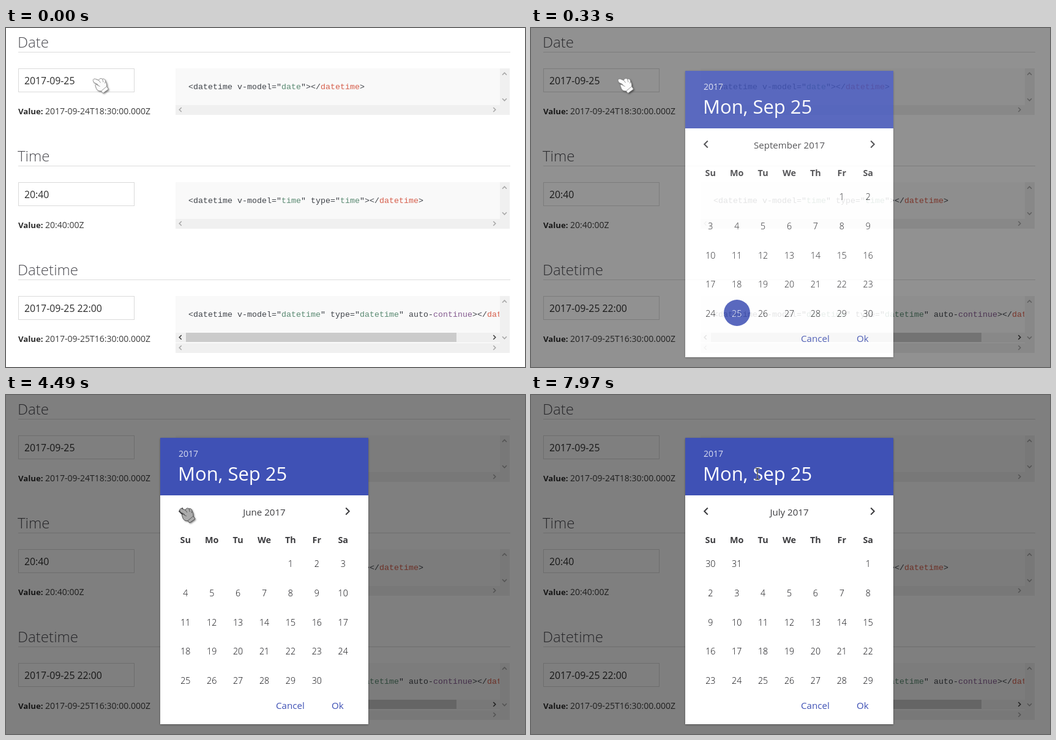
Write an HTML page with a canvas that moves like this. It is 848 px wide and 554 px high and loops after 8000 ms.

```html
<!DOCTYPE html>
<html lang="en">
<head>
<meta charset="utf-8">
<title>Datetime picker</title>
<style>
html, body { margin: 0; width: 100%; height: 100%; overflow: hidden; background: #fff; }
canvas { display: block; }
</style>
</head>
<body>
<canvas id="stage" width="848" height="554"></canvas>
<script>
const W = 848, H = 554, LOOP = 8000;
const SANS = '"Open Sans", "Noto Sans", sans-serif';
const MONO = '"Liberation Mono", monospace';
const BLUE = '#3f51b5', INK = '#3c3c3f';

const stage = document.getElementById('stage').getContext('2d');
const newLayer = () => {
  const c = document.createElement('canvas');
  c.width = W;
  c.height = H;
  return c.getContext('2d');
};
const modal = newLayer();

function rect(g, color, x, y, w, h) {
  g.fillStyle = color;
  g.fillRect(x, y, w, h);
}

function text(g, str, x, y, size, color, weight = 400, align = 'left', family = SANS) {
  g.font = `${weight} ${size}px ${family}`;
  g.textAlign = align;
  g.fillStyle = color;
  g.fillText(str, x, y);
}

// Angle mark centred on x, y; (dx, dy) is the direction it points to.
function chevron(g, x, y, dx, dy, r, width, color) {
  const h = r / 2;
  g.beginPath();
  g.moveTo(x - dx * h + dy * r, y - dy * h + dx * r);
  g.lineTo(x + dx * h, y + dy * h);
  g.lineTo(x - dx * h - dy * r, y - dy * h - dx * r);
  g.lineWidth = width;
  g.strokeStyle = color;
  g.stroke();
}

// ---- Page ----

const PLAIN = '#40444a', GREEN = '#5a8a72', RED = '#d65f4c', PURPLE = '#865c91';
const close = [['></', PLAIN], ['datetime', RED], ['>', PLAIN]];
const quoted = (name, value) => [[name + '="', PLAIN], [value, GREEN], ['"', PLAIN]];

const sections = [
  { title: 'Date', field: '2017-09-25', value: '2017-09-24T18:30:00.000Z',
    code: [['<datetime ', PLAIN], ...quoted('v-model', 'date'), ...close] },
  { title: 'Time', field: '20:40', value: '20:40:00Z',
    code: [['<datetime ', PLAIN], ...quoted('v-model', 'time'), ...quoted(' type', 'time'), ...close] },
  { title: 'Datetime', field: '2017-09-25 22:00', value: '2017-09-25T16:30:00.000Z', wide: true,
    code: [['<datetime ', PLAIN], ...quoted('v-model', 'datetime'), ...quoted(' type', 'datetime'),
      [' auto-', PLAIN], ['continue', PURPLE], ...close] }
];

function scrollArrows(g, y, color) {
  chevron(g, 285, y, -1, 0, 3.5, 1.6, color);
  chevron(g, 798, y, 1, 0, 3.5, 1.6, color);
}

function drawCode(g, y, { code, wide }) {
  const bar = y + (wide ? 77 : 60), height = wide ? 93 : 76;
  rect(g, '#f9f9f9', 277, y, 530, bar - y);
  rect(g, '#f0f0f0', 807, y, 16, height);
  rect(g, '#f0f0f0', 277, bar, 530, 16);
  chevron(g, 814.5, y + 9, 0, -1, 3.5, 1.6, '#a8a8a8');
  chevron(g, 814.5, bar - 9, 0, 1, 3.5, 1.6, '#a8a8a8');
  scrollArrows(g, bar + 7.5, '#a8a8a8');
  if (wide) {
    rect(g, '#f0f0f0', 277, y + 60, 530, 16);
    rect(g, '#fff', 277, y + 76, 530, 1);
    rect(g, '#cbcbcb', 294, y + 60, 442, 15);
    scrollArrows(g, y + 67.5, '#404040');
  }
  g.save();
  g.beginPath();
  g.rect(277, y, 529, 60);
  g.clip();
  let x = 298;
  for (const [str, color] of code) {
    text(g, str, x, y + 34, 13.33, color, 400, 'left', MONO);
    x += g.measureText(str).width;
  }
  g.restore();
}

function drawPage(g) {
  rect(g, '#fff', 0, 0, W, H);
  sections.forEach((s, i) => {
    const y = i * 186;
    text(g, s.title, 19, y + 32, 24.1, '#4c4c52', 300);
    rect(g, '#dcdcdc', 20, y + 39, 804, 1);
    g.lineWidth = 1;
    g.strokeStyle = '#dadada';
    g.strokeRect(20.5, y + 66.5, 189, 38);
    text(g, s.field, 30, y + 92, 15.8, '#2c2c2c');
    text(g, 'Value:', 20, y + 141, 13.2, '#2c2c2c', 700);
    text(g, s.value, 64, y + 141, 14, '#3c3c3c');
    drawCode(g, y + 66, s);
  });
}

// ---- Date picker ----

const months = {
  sep: { name: 'September', first: 5, days: 30 },
  aug: { name: 'August', first: 2, days: 31 },
  jul: { name: 'July', first: 6, days: 31 },
  jun: { name: 'June', first: 4, days: 30 }
};
const views = [[0, 'sep'], [2470, 'aug'], [3250, 'jul'], [4490, 'jun'], [6340, 'jul']];
const fadeIn = [[0, 0], [150, 0.32], [250, 0.66], [330, 0.86], [400, 0.97], [480, 1]];
const mark = [[0, 1], [2550, 0.6], [2620, 0.25], [2700, 0]];

// Latest value whose time has come.
const stepAt = (list, t) => list.reduce((v, [from, next]) => (t >= from ? next : v), list[0][1]);

const colX = c => 293.3 + c * 42.9;

function drawDays(g, { first, days }, markAlpha) {
  for (let d = 1; d <= days; d++) {
    const cell = (first + d - 1) % 35;
    const x = colX(cell % 7), y = 281 + Math.floor(cell / 7) * 47.75;
    text(g, d, x, y, 14.2, '#08080c', 300, 'center');
    if (cell === 29 && markAlpha > 0) {
      g.globalAlpha = markAlpha;
      g.beginPath();
      g.arc(336.5, 465.5, 21.5, 0, Math.PI * 2);
      g.fillStyle = BLUE;
      g.fill();
      text(g, d, x, y, 14.2, '#fff', 300, 'center');
      g.globalAlpha = 1;
    }
  }
}

function drawModal(g, t) {
  const month = months[stepAt(views, t)];
  g.clearRect(0, 0, W, H);
  rect(g, 'rgba(0,0,0,.5)', 0, 0, W, H);
  g.save();
  g.shadowColor = 'rgba(0,0,0,.35)';
  g.shadowBlur = 3;
  g.shadowOffsetY = 1;
  rect(g, '#fff', 252, 70, 340, 468);
  g.restore();
  rect(g, BLUE, 252, 70, 340, 94);
  text(g, '2017', 282, 101, 14, 'rgba(255,255,255,.8)');
  text(g, 'Mon, Sep 25', 281, 140, 31, '#fff');
  chevron(g, 286, 190, -1, 0, 5.5, 2, INK);
  chevron(g, 558, 190, 1, 0, 5.5, 2, INK);
  text(g, month.name + ' 2017', 422, 197, 15.1, INK, 400, 'center');
  ['Su', 'Mo', 'Tu', 'We', 'Th', 'Fr', 'Sa'].forEach((day, c) =>
    text(g, day, colX(c), 242, 14.4, INK, 700, 'center'));
  drawDays(g, month, stepAt(mark, t));
  text(g, 'Cancel', 441, 513, 15.2, BLUE);
  text(g, 'Ok', 532, 513, 15.2, BLUE);
}

// ---- Pointer ----

// Each move: start, end, number of steps, points passed after the current one.
const moves = [
  [630, 1000, 6, [[312, 206]]],
  [1150, 1690, 8, [[315, 208], [282, 189]]],
  [1840, 1840, 1, [[281, 187]]],
  [2010, 2090, 2, [[284, 187]]],
  [4800, 5560, 11, [[554, 190]]],
  [5730, 6040, 5, [[555, 187], [561, 192]]],
  [7200, 7970, 11, [[470, 120], [370, 129]]]
];

function along(points, u) {
  const s = u * (points.length - 1);
  const i = Math.min(Math.floor(s), points.length - 2);
  return points[i].map((v, k) => v + (points[i + 1][k] - v) * (s - i));
}

function pointerAt(t) {
  let pos = [142.5, 84.5];
  for (const [from, to, n, points] of moves) {
    if (t < from) break;
    const gap = n > 1 ? (to - from) / (n - 1) : 1;
    const u = Math.min(n, Math.floor((t - from) / gap + 1.001)) / n;
    pos = along([pos, ...points], u * u * (3 - 2 * u));
  }
  return pos;
}

function pointerKind(t, x, y) {
  if (t < 630) return 'hand';
  if (y > 166 && y < 212 && (x < 311 || x > 533)) return 'hand';
  if (y > 108 && y < 152 && x > 282 && x < 458) return 'beam';
  if (y > 180 && y < 202 && x > 386 && x < 458) return 'beam';
  return 'arrow';
}

const handShape = new Path2D(
  'M0 2C-1-1 2-2 4-1L9 1C10-2 13-3 15-1C18-2 20 0 20 3C22 5 22 8 22 11' +
  'L25 15.5L16 22L13 18.5C9 19 6 17 5 14L3.5 10C3 7.5 6 7.5 8 9.5L7 7.5L1 4.5Z');
const handFolds = new Path2D('M9 1L12 5M15-1L16.5 4M20 3L19 6M8 9.5L11 11M13 18.5L22 11');
const arrowShape = new Path2D('M0 0V16.5L4 12.8L6.6 18.6L9 17.5L6.5 12H12Z');
const beamShape = new Path2D('M-3.5-9H-1L0-8L1-9H3.5M0-8V8M-3.5 9H-1L0 8L1 9H3.5');

function solid(g, shape, fill, line) {
  g.save();
  g.shadowColor = 'rgba(0,0,0,.55)';
  g.shadowBlur = 3;
  g.shadowOffsetX = g.shadowOffsetY = 1.5;
  g.fillStyle = fill;
  g.fill(shape);
  g.restore();
  g.lineWidth = 1;
  g.strokeStyle = line;
  g.stroke(shape);
}

function drawPointer(g, t) {
  const [x, y] = pointerAt(t);
  const pressed = (t >= 2240 && t < 4800) || (t >= 6040 && t < 6970);
  const kind = pointerKind(t, x, y);
  g.save();
  g.translate(x, y);
  g.lineJoin = 'round';
  if (kind === 'hand') {
    const line = pressed ? '#505050' : '#8c8c8c';
    solid(g, handShape, pressed ? '#ababab' : '#fbfbfb', line);
    g.lineWidth = 0.9;
    g.stroke(handFolds);
  } else if (kind === 'arrow') {
    solid(g, arrowShape, '#fff', '#333');
  } else {
    g.lineWidth = 2.4;
    g.strokeStyle = 'rgba(205,205,205,.75)';
    g.stroke(beamShape);
    g.lineWidth = 1.1;
    g.strokeStyle = '#222';
    g.stroke(beamShape);
  }
  g.restore();
}

function draw(t) {
  drawPage(stage);
  const alpha = stepAt(fadeIn, t);
  if (alpha > 0) {
    drawModal(modal, t);
    stage.globalAlpha = alpha;
    stage.drawImage(modal.canvas, 0, 0);
    stage.globalAlpha = 1;
  }
  drawPointer(stage, t);
}

const start = performance.now();
function tick() {
  draw((performance.now() - start) % LOOP);
  requestAnimationFrame(tick);
}
tick();
</script>
</body>
</html>
```
